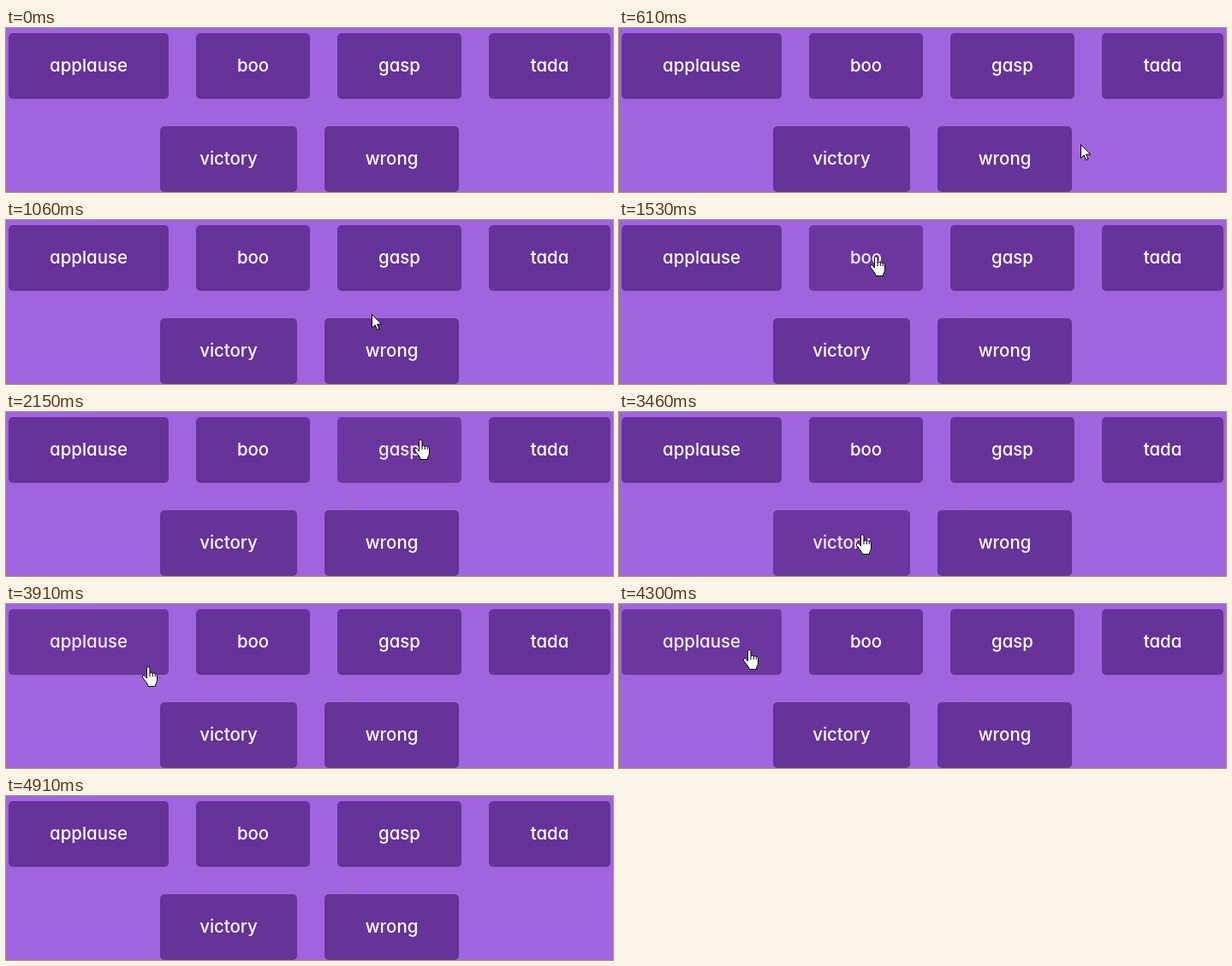
Recreate the animation shown at these times as an HTML page. Size 709 by 192 pixels, loop 5.15 s.

```html
<!DOCTYPE html>
<html lang="en">
<head>
<meta charset="utf-8">
<title>Sound board</title>
<style>
html, body { margin: 0; width: 100%; height: 100%; overflow: hidden; background: #a164df; }
svg { display: block; }
text { font: 500 20.4px Inter, "Open Sans", sans-serif; font-feature-settings: "cv11"; fill: #fff; text-anchor: middle; }
.button rect { fill: #639; }
.hover { opacity: .9; }
.cursor { fill: #fff; stroke: #000; stroke-linejoin: round; }
</style>
</head>
<body>
<svg width="709" height="192" viewBox="0 0 709 192">
  <g id="specks" fill="#9079b0"></g>
  <g id="buttons"></g>
  <circle id="click" r="12" fill="#ff0" opacity=".47"/>
  <path id="arrow" class="cursor" d="M.5.5v16l3.7-3.6 2.4 5.6 2.4-1-2.4-5.5h5z"/>
  <g id="hand" class="cursor">
    <path d="M6 2.5q0-2 1.7-2t1.8 2v6q.2-1.3 1.7-1.3t1.6 1.6q.3-1 1.5-1t1.4 1.6q.2-.7 1.1-.5 1.2.2 1.2 2v5q0 2-1 3.5t-1 4h-8.5q0-2-2-4.5L1.2 13.5q-1-1.8.2-2.7t2.6.6l2 2.6z"/>
    <path fill="none" d="M9.5 8.5v3.5M12.8 9v3M15.8 10v2"/>
  </g>
</svg>
<script>
const LOOP = 5150, TICK = 76.8, CLICK_TICK = 37;
const WIDTH = 709, HEIGHT = 77, GAP = 32, TOP = 6;
const $ = id => document.getElementById(id);

function add(parent, tag, attrs, text = '') {
  const el = document.createElementNS('http://www.w3.org/2000/svg', tag);
  for (const name in attrs) el.setAttribute(name, attrs[name]);
  el.textContent = text;
  parent.append(el);
  return el;
}

// Label and width of each button; every row is centred
const rows = [
  { applause: 187, boo: 133, gasp: 145, tada: 142 },
  { victory: 160, wrong: 157 }
];
const buttons = rows.flatMap((row, i) => {
  const widths = Object.values(row);
  const total = widths.reduce((sum, w) => sum + w + GAP, -GAP);
  const y = TOP + i * (HEIGHT + GAP);
  let left = (WIDTH - total) / 2;
  return Object.entries(row).map(([label, width]) => {
    const x = left, el = add($('buttons'), 'g', { class: 'button' });
    left += width + GAP;
    add(el, 'rect', { x, y, width, height: HEIGHT, rx: 5 });
    add(el, 'text', { x: x + width / 2, y: y + 45 }, label);
    return { el, x, y, width };
  });
});

// Pointer stops: tick of arrival, place, ticks to rest
const stops = [
  { at: 1, x: 667, y: 170 },
  { at: 8, x: 539, y: 136 },
  { at: 10, x: 484, y: 141, rest: 1 },
  { at: 20, x: 301, y: 43, rest: 2 },
  { at: 28, x: 485, y: 33 },
  { at: 34, x: 605, y: 33, rest: 5 },
  { at: 45, x: 285, y: 144, rest: 1 },
  { at: 53, x: 120, y: 46 },
  { at: 56, x: 153, y: 54 },
  { at: 60, x: 562, y: 124 },
  { at: 63, x: 687, y: 178 }
];

function pointerAt(tick) {
  const i = stops.findIndex(s => s.at >= tick);
  if (tick < 1 || i < 0) return null;
  const to = stops[i], from = stops[i - 1] || to;
  const leave = from.at + (from.rest || 0);
  const f = tick >= to.at ? 1 : Math.max(0, (tick - leave) / (to.at - leave));
  const ease = to.rest ? 1 - (1 - f) ** 1.5 : f;
  const mix = (a, b) => Math.round(a + (b - a) * ease);
  return { x: mix(from.x, to.x), y: mix(from.y, to.y) };
}

// Traces left behind the button edges: first tick and place
const specks = [[16, 402, 109], [26, 385, 53], [32, 562, 42], [50, 225, 113], [60, 461, 114]]
  .map(([from, x, y]) => ({
    from, el: add($('specks'), 'path', { d: `M${x} ${y}l7 7h-7z` })
  }));

function show(el, on, x = 0, y = 0) {
  el.setAttribute('visibility', on ? 'visible' : 'hidden');
  el.setAttribute('transform', `translate(${x} ${y})`);
}

function draw() {
  const tick = Math.floor((performance.now() % LOOP + 8) / TICK);
  const p = pointerAt(tick);
  let over = false;
  for (const b of buttons) {
    const hit = !!p && p.x >= b.x && p.x < b.x + b.width && p.y >= b.y && p.y < b.y + HEIGHT;
    b.el.classList.toggle('hover', hit);
    over = over || hit;
  }
  for (const s of specks) show(s.el, tick >= s.from);
  const { x, y } = p || { x: 0, y: 0 };
  show($('click'), tick === CLICK_TICK, x, y);
  show($('arrow'), p && !over, x, y);
  show($('hand'), over, x - 8.5, y - 1);
  requestAnimationFrame(draw);
}
draw();
</script>
</body>
</html>
```
